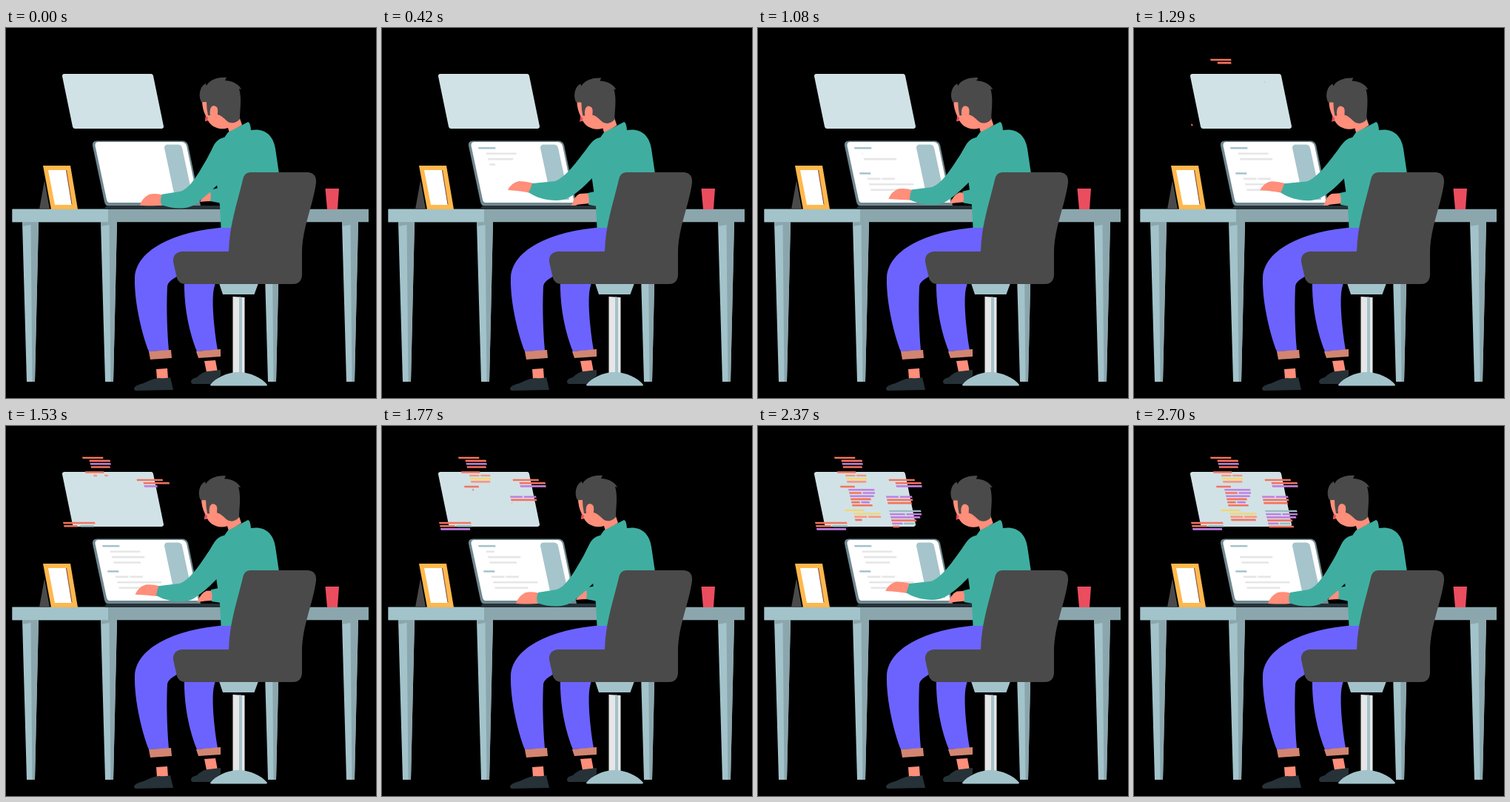
Write an HTML page that moves like this. It is 500 by 500 pixels and loops after 2730 ms.

```html
<!DOCTYPE html>
<html>
<head>
<meta charset="utf-8">
<style>
html, body { margin: 0; width: 100%; height: 100%; overflow: hidden; background: #000; }
svg { display: block; width: 100vw; height: 100vh; }
</style>
</head>
<body>
<svg viewBox="0 0 500 500">
  <defs>
    <g id="leg">
      <path fill="#a3c3cb" d="M22 262H44L39 478H28Z"/>
      <path fill="#8ba6ad" d="M22 262H44L39 478H35.500L33.500 266L22 268Z"/>
    </g>
  </defs>

  <path fill="#d1e2e7" stroke="#d1e2e7" stroke-width="6" stroke-linejoin="round" d="M79 65H196L210 133H93Z"/>
  <g id="code"></g>

  <use href="#leg"/>
  <use href="#leg" x="106"/>
  <use href="#leg" x="326"/>
  <use href="#leg" x="432"/>
  <path fill="#8ba6ad" d="M8.500 244.700H490V262.300H8.500Z"/>
  <path fill="#a3c3cb" d="M8.500 244.700H138V262.300H8.500Z"/>

  <path fill="#4a4a4a" d="M52 206L59 245H45Z"/>
  <path fill="#ffb84d" d="M50 186H87L97 245H61Z"/>
  <path fill="#fff" d="M57 192H81L89 239H66Z"/>
  <path fill="none" stroke="#7d4a43" d="M81.500 192L89 238.500"/>
  <path fill="#eb4d5f" d="M431.500 217H450L448 245H434Z"/>

  <path fill="#6f8790" d="M123 152.500H238Q244 152.500 246 158L263 240H136Q134 239 133 235L117 159Q116 152.500 123 152.500Z"/>
  <path fill="#fff" d="M125 154H237Q242 154 244 159L260 236H140Q137 236 136 232L120.500 159Q120 154 125 154Z"/>
  <path fill="#a6c4cb" d="M218 157.500H232Q237 157.500 238 162L253 232H232Q229 232 228 228L214 162Q214 157.500 218 157.500Z"/>
  <g id="screen"></g>
  <path fill="#263238" d="M138 240H291V245H134Q133 241 138 240Z"/>

  <g fill="#ff8e7a">
    <path d="M203 461L218 460L219 474H204ZM268 450L283 449L286 465H271Z"/>
    <path id="farHand"/>
  </g>
  <path fill="#263238" d="M173 487Q174 483 186 480Q200 473 207 473Q215 474 222 472L226 489L176 490Q173 490 173 487ZM250 479Q249 474 258 472Q266 464 273 464L290 462V470L276 481H252Z"/>
  <path fill="#6c63ff" d="M241 340C240 380 249 415 258 437L286 435C280 400 278 365 281 352L284 340ZM305 269C245 271 177 293 174 337C173 372 185 418 193 437L220 436C217 400 217 370 218 349C219 342 227 338 236 333L310 310Z"/>
  <path fill="#d28570" d="M193 437L223 435L224 446L195 448ZM257 437L290 434V444L260 446Z"/>

  <g id="head">
    <path fill="#ff8e7a" d="M265 98L275 92L312 110L319 131L302 142L300 135C287 139 276 132 273 125L269 126L270 119Q265 109 265 98Z"/>
    <path fill="#e84a5f" d="M270 119L273 121L272 125L269 126Z"/>
    <path fill="#4a4a4a" d="M264 100C259 90 263 78 270 75L271 78C275 70 286 66 298 67L296 71C306 71 315 76 318 83L315 82C319 96 316 110 316 123C310 130 303 129 299 126C295 123 293 119 286 117C286 113 288 106 281 105C276 105 275 112 276 118H273Q271 109 271 100Z"/>
  </g>
  <path id="farSleeve" fill="#3faea0"/>
  <path fill="#3faea0" d="M295 148L300 141L327 127Q330 127 331 138C350 135 361 145 364 163L369 197L320 240L304 270H290.500L289 240L284 205L278 165Q283 150 295 148Z"/>
  <path id="hand" fill="#ff8e7a"/>
  <path id="sleeve" fill="#3faea0"/>

  <path fill="#a3c3cb" d="M288 345H341L335.500 360H293Z"/>
  <path fill="#e6e6e6" d="M306.500 363L322.500 364V468H306.500Z"/>
  <path fill="#a3c3cb" d="M315 363.500L319 364V468H315ZM276 482C283 473 299 465 314 465C330 465 346 473 353 482Q353 483.500 350 483.500H279Q276 483.500 276 482Z"/>
  <path fill="#4a4a4a" d="M330 195H408Q420 196 419 209C415 240 400 270 400 305V334Q399 346 388 346H242Q233 345 231 338L226 316Q225 304 237 302H301C302 265 313 235 320 205Q322 195 330 195Z"/>
</svg>
<script>
const LOOP = 2730, STROKE = LOOP / 3;
const byId = id => document.getElementById(id);
const clamp = v => Math.min(1, Math.max(0, v));
const mix = (a, b, k) => a + (b - a) * k;
const colors = { r: '#f4735e', p: '#c17fe0', o: '#f9977f', y: '#f3d774', t: '#9dbcc4', b: '#a3c3cb', g: '#e6e6e6' };
const bars = [];

function addBar(parent, x, y, width, color, share) {
  const el = document.createElementNS('http://www.w3.org/2000/svg', 'path');
  el.setAttribute('fill', colors[color]);
  byId(parent).append(el);
  bars.push(t => {
    const w = width * share(t);
    el.setAttribute('d', w > 0 ? `M${x} ${y - 1.3}h${w}l.6 2.6h${-w}z` : '');
  });
}

// A row with two colour letters is split into two words.
function addRow(parent, x, y, width, words, share) {
  const gap = 1.8, w = (width - gap * (words.length - 1)) / words.length;
  [...words].forEach((color, i) => addBar(parent, x + i * (w + gap), y, w, color, share));
}

// Floating code: rows lean right with the panel, long paragraphs taper.
function addColumn(start, step, paragraphs) {
  let n = 0;
  for (const [x, y, width, rows] of paragraphs)
    rows.split(' ').forEach((words, i) => {
      const begin = start + step * n++;
      const taper = 1 - .3 * Math.sin(i * Math.PI / 8) ** 4;
      addRow('code', x + i, y + i * 4.2, width * taper, words, t => clamp((t - begin) / step));
    });
}

addColumn(1183, 65, [
  [103, 43, 28, 'r'], [112.5, 47.1, 28, 'r p r'], [107, 62.5, 25, 'r'], [118, 67, 28, 'oo y o'],
  [111, 82, 19.5, 'r'], [122, 86.3, 35, 'p rp p r rp r'], [117, 114, 26, 'y'], [129, 118.5, 36, 'y oo r']
]);
addColumn(1290, 96, [
  [176.5, 73, 35, 'r'], [185.5, 77.2, 35, 'r p'], [173, 95.7, 35, 'pp r r'], [177, 115, 43, 't pp p r pt r']
]);
addColumn(1285, 130, [[77, 131, 43, 'r rt p']]);

// Laptop text: a short heading over three indented rows, typed one after another.
[[130, 162.3, [23, 40.5, 44, 36.5], 'g'], [137, 196.5, [15, 37, 60, 45], 'gg']].forEach(([x, y, widths, first], block) =>
  widths.forEach((width, i) => {
    const begin = 60 + 107 * (block * 4 + i);
    const retyped = !block && i % 2;
    const words = !i ? 'b' : i === 1 ? first : 'g';
    addRow('screen', x + i * 2.2 + (i && 8.5), y + i * 7.4, width, words, t => {
      const age = (retyped ? t % STROKE : t) - begin;
      return clamp(age / 190) * (retyped ? clamp((710 - age) / 60) : 1);
    });
  }));

// Resting pose and raised pose.
const poses = {
  hand: ['M181 240Q184 230 194 225Q203 223 213 226L211 240Q200 241 181 240Z',
         'M170 219Q175 209 185 207Q194 207 205 210L201 223Q188 220 170 219Z'],
  sleeve: ['M295 148C283 151 279 163 272 176C260 197 249 217 236 221L211 225Q208 232 210 239C225 245 246 246 258 237C272 226 280 218 288 210L310 170Z',
           'M295 148C285 151 281 157 276 164C262 182 249 201 234 207L203 210Q201 217 198 222C213 233 239 236 251 230C265 223 277 210 286 201L310 170Z'],
  farHand: ['M262 235Q267 225 276 221L280 222L278 234Q270 234 262 235Z',
            'M256 240Q260 227 267 224L282 223L281 237Q268 238 256 240Z'],
  farSleeve: ['M292 215L275 219Q278 226 276 234L292 237Z',
              'M292 220L278 223Q281 231 279 239L292 241Z']
};

function mixPath([a, b], k) {
  const target = b.match(/\d+/g);
  let i = 0;
  return a.replace(/\d+/g, n => mix(+n, +target[i++], k).toFixed(2));
}

function draw(now) {
  const t = now % LOOP;
  const lift = (1 - Math.cos((t + 36) / STROKE * 2 * Math.PI)) / 2;
  for (const id in poses) byId(id).setAttribute('d', mixPath(poses[id], lift));
  byId('head').setAttribute('transform', `translate(${-1.6 * lift} ${.6 * lift})`);
  bars.forEach(update => update(t));
}

const begin = performance.now();
function tick() {
  draw(performance.now() - begin);
  requestAnimationFrame(tick);
}
tick();
</script>
</body>
</html>
```
